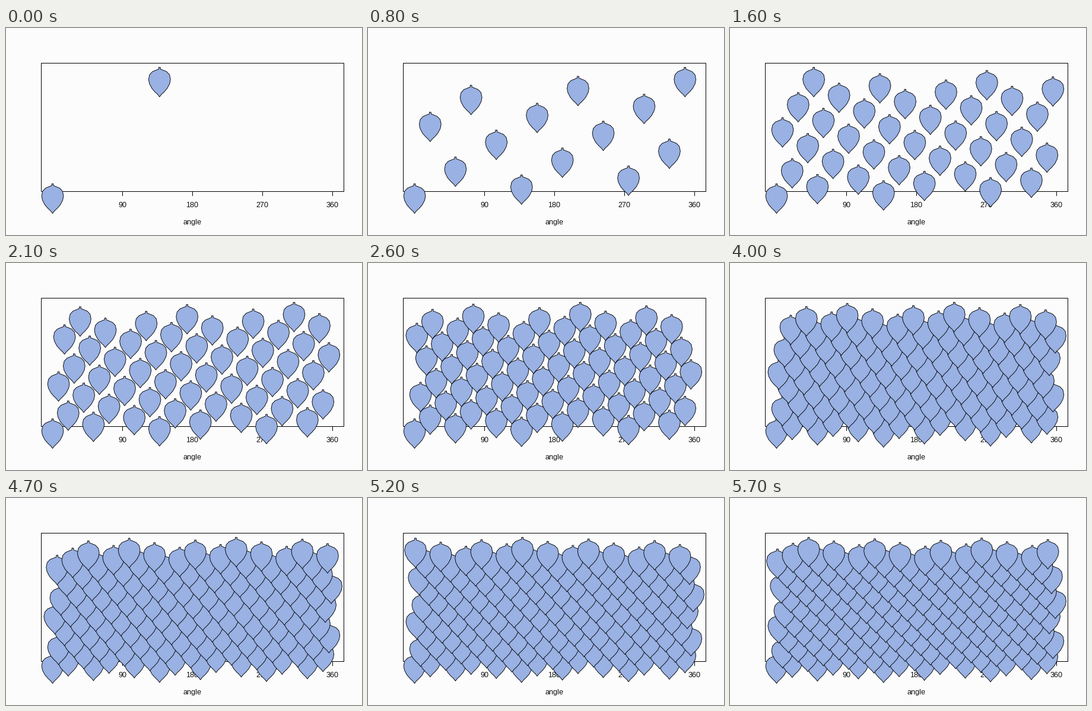
A matplotlib script for the animation above (6300 ms loop, 600 by 350 pixels).

```python
import numpy as np
import matplotlib.pyplot as plt
from matplotlib.animation import FuncAnimation
from matplotlib.collections import PolyCollection
from matplotlib.patches import Rectangle

W, H, DPI = 600, 350, 100
PX = 72 / DPI                       # one pixel in points
GOLDEN = 180 * (3 - np.sqrt(5))     # divergence angle in degrees
X0, PER_DEG = 78.5, 118 / 90
BASE, RISE = 313.5, 197             # tip of the lowest leaf, height of the stack
FRAMES, STEP_MS = 63, 100
BACK, FILL = "#fcfcfc", "#99b1e3"

# Leaf counts: one by one at first, then three at a time
COUNTS = [*range(2, 7), *range(8, 162, 3)]

# Right half of the leaf from stem to tip: offset from the axis, drop from top
HALF = np.array([(1.4, 0), (1.4, 3), (6, 4.8), (12, 7.3), (16.8, 12.5),
                 (18.4, 20.5), (17.1, 27.5), (13, 35.5), (8, 41.3), (3, 46),
                 (0, 50)])
LEAF = np.vstack([HALF, HALF[-2::-1] * (-1, 1)]) - (0, 50)

plt.rcParams.update({"font.family": "Liberation Sans",
                     "text.hinting": "native", "text.hinting_factor": 1})
fig = plt.figure(figsize=(W / DPI, H / DPI), dpi=DPI, facecolor=BACK)
ax = fig.add_axes([0, 0, 1, 1])
ax.set_xlim(0, W)
ax.set_ylim(H, 0)
ax.axis("off")

ax.add_patch(Rectangle((59.5, 59.5), 510, 217, fill=False, ec="black",
                       lw=PX, snap=False))


def label(x, baseline, text):
    ax.text(x, baseline, text, ha="center", va="baseline",
            fontsize=12 * PX, color="black", zorder=2)


for deg in range(90, 361, 90):
    x = X0 + deg * PER_DEG
    ax.plot([x, x], [276.5, 283.5], color="black", lw=PX, snap=False)
    label(x - 0.5, 303, str(deg))
label(314, 332, "angle")

leaves = PolyCollection([], facecolors=FILL, edgecolors="black",
                        linewidths=0.9 * PX, zorder=3)
ax.add_collection(leaves, autolim=False)


def draw(frame):
    count = COUNTS[min(max(frame - 1, 0), len(COUNTS) - 1)]
    n = np.arange(count)
    tips = np.column_stack([X0 + n * GOLDEN % 360 * PER_DEG,
                            BASE - RISE * n / (count - 1)])
    leaves.set_verts(list(tips[:, None] + LEAF))
    return [leaves]


anim = FuncAnimation(fig, draw, frames=FRAMES, interval=STEP_MS,
                     repeat=True, repeat_delay=0)
plt.show()
```
